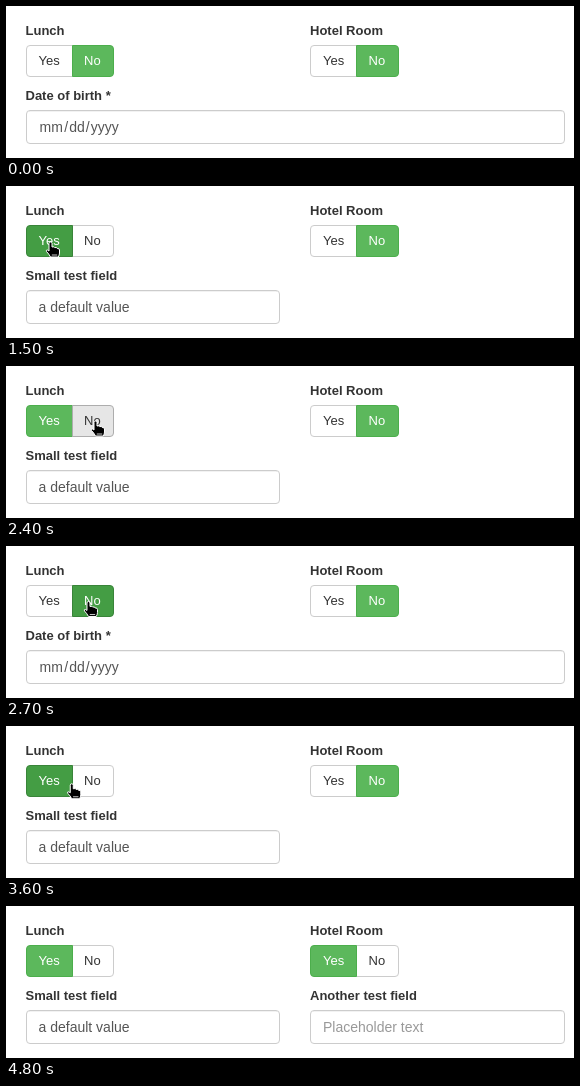
An HTML page for the animation above (6200 ms loop, 568 by 152 pixels).

```html
<!DOCTYPE html>
<html lang="en">
<head>
<meta charset="utf-8">
<title>Conditional form fields</title>
<style>
  html, body { margin: 0; width: 100%; height: 100%; overflow: hidden; background: #fff; }
  svg { display: block; width: 568px; height: 152px; }
  text { font: 13px "Liberation Sans", Arial, sans-serif; fill: #333; white-space: pre; }
  .label { font-weight: bold; }
  .value { font-size: 14px; fill: #555; }
  .hint { fill: #999; }
  .box { fill: #fff; stroke: #ccc; }
  .inset { stroke: #000; stroke-opacity: .05; }
  .btn path { fill: #fff; stroke: #ccc; }
  .btn.hover path { fill: #e6e6e6; stroke: #adadad; }
  .btn.on path { fill: #5cb85c; stroke: #4cae4c; }
  .btn.on.hover path { fill: #449d44; stroke: #398439; }
  .btn.on text { fill: #fff; }
  .cursor { fill: #000; stroke: #fff; stroke-linejoin: round; }
</style>
</head>
<body>
<svg id="stage" viewBox="0 0 568 152"></svg>
<script>
const LOOP = 6200, STEP = 100;
const stage = document.getElementById('stage');

function add(parent, tag, attrs, content) {
  const el = document.createElementNS('http://www.w3.org/2000/svg', tag);
  for (const k in attrs) el.setAttribute(k, attrs[k]);
  if (content) el.textContent = content;
  parent.append(el);
  return el;
}

const group = () => add(stage, 'g', {});
const label = (g, x, y, s) => add(g, 'text', { x, y, class: 'label' }, s);
const value = (g, x, s, cls = '') => add(g, 'text', { x, y: 126, class: 'value ' + cls }, s);

function field(x, right, title) {
  const g = group();
  label(g, x === 20 ? 19.5 : x, 94, title);
  add(g, 'rect', { x: x + .5, y: 104.5, width: right - x - 1, height: 33, rx: 3.5, class: 'box' });
  add(g, 'path', { d: `M${x + 3} 105.5H${right - 3}`, class: 'inset' });
  return g;
}

// One half of a toggle; only its outer corners are round.
function button(left, right, textX, text, first) {
  const g = add(stage, 'g', { class: 'btn' });
  const a = left + .5, b = right - .5, r = 3.5, t = 39.5, h = 31;
  const d = first
    ? `M${b} ${t}H${a + r}a${r} ${r} 0 0 0 ${-r} ${r}v${h - 2 * r}a${r} ${r} 0 0 0 ${r} ${r}H${b}Z`
    : `M${a} ${t}H${b - r}a${r} ${r} 0 0 1 ${r} ${r}v${h - 2 * r}a${r} ${r} 0 0 1 ${-r} ${r}H${a}Z`;
  add(g, 'path', { d });
  add(g, 'text', { x: textX, y: 59 }, text);
  return { g, left, right };
}

function toggle(x, title, labelX, dx) {
  label(stage, labelX, 29, title);
  return {
    yes: button(x, x + 47, x + 12.5 + dx, 'Yes', true),
    no: button(x + 46, x + 88 + dx * 2, x + 58 + dx, 'No', false)
  };
}

const lunch = toggle(20, 'Lunch', 19.5, 0);
const room = toggle(304, 'Hotel Room', 304, .5);
const buttons = [lunch.yes, lunch.no, room.yes, room.no];

const birth = field(20, 559, 'Date of birth *');
value(birth, 33.5, 'mm');
value(birth, 58.3, '/');
value(birth, 63.2, 'dd');
value(birth, 79.8, '/');
value(birth, 84.7, 'yyyy');

const small = field(20, 274, 'Small test field');
value(small, 32.5, 'a default value');

const other = field(304, 559, 'Another test field');
value(other, 317, 'Placeholder text', 'hint');

const cursor = add(stage, 'g', { class: 'cursor' });
const arrow = add(cursor, 'path', {
  d: 'M0 0V14L3.2 11L5.8 16.8L8.2 15.7L5.7 10.2H10.2Z'
});
const hand = add(cursor, 'g', {});
add(hand, 'path', {
  d: 'M-2 1.5Q-2 0-.5 0Q1 0 1 1.5V5Q3.5 4.3 3.7 5.6Q6 5 6.2 6.5' +
     'Q8.5 6.2 8.5 8V11Q8.5 13 7.3 15H-.5Q-2 12-4.5 9.5Q-5.2 7.8-3.5 8L-2 9Z'
});
add(hand, 'path', { d: 'M.8 13H6.2', 'stroke-width': .8 });

// Pointer path: time, x, y
const path = [
  [300, 25, 126], [700, 35, 72], [900, 45, 56],
  [1800, 45, 56], [2100, 62, 137], [2400, 90, 55],
  [2600, 90, 55], [3000, 45, 58],
  [3500, 45, 58], [4100, 332, 55],
  [4300, 332, 55], [4800, 346, 172]
];

function pointer(t) {
  const i = path.findIndex(p => p[0] > t);
  if (i < 1) return null;
  const [t0, x0, y0] = path[i - 1], [t1, x1, y1] = path[i];
  let k = (t - t0) / (t1 - t0);
  if (t >= 900) k = k * k * (3 - 2 * k);
  return { x: x0 + (x1 - x0) * k, y: y0 + (y1 - y0) * k };
}

const within = (t, a, b) => t >= a && t < b;
const show = (el, on) => { el.style.display = on ? '' : 'none'; };

function draw(now) {
  const t = Math.floor((now % LOOP) / STEP) * STEP;
  const lunchOn = within(t, 1500, 2600) || t >= 3500;
  const roomOn = t >= 4300;
  const states = [lunchOn, !lunchOn, roomOn, !roomOn];
  const p = pointer(t);
  const over = p && p.y >= 39 && p.y < 71
    ? buttons.findIndex(b => p.x >= b.left && p.x < b.right) : -1;

  buttons.forEach((b, i) => {
    b.g.classList.toggle('on', states[i]);
    b.g.classList.toggle('hover', i === over);
  });
  // The raised half owns the shared edge.
  for (const [i, pair] of [[0, lunch], [2, room]]) {
    const raised = states[i] && over !== i + 1;
    const top = raised ? pair.yes.g : pair.no.g;
    const under = raised ? pair.no.g : pair.yes.g;
    if (under.nextSibling !== top) top.before(under);
  }

  show(birth, !lunchOn);
  show(small, lunchOn);
  show(other, roomOn);
  show(cursor, p);
  if (p) {
    cursor.setAttribute('transform', `translate(${p.x} ${p.y})`);
    show(hand, over >= 0);
    show(arrow, over < 0);
  }
}

const start = performance.now();
function tick() {
  draw(performance.now() - start);
  requestAnimationFrame(tick);
}
tick();
</script>
</body>
</html>
```
